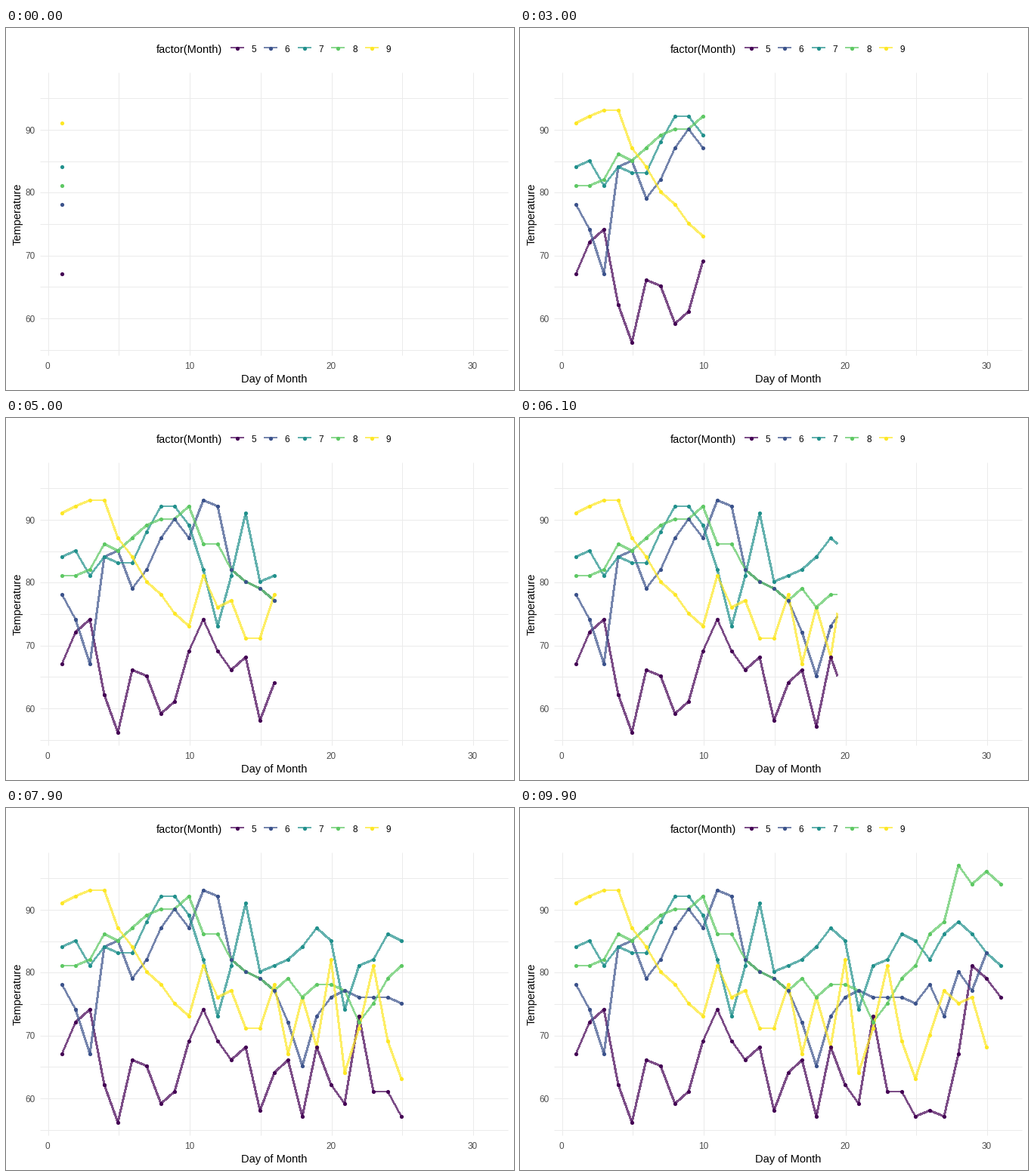
A matplotlib script for the animation above (10000 ms loop, 672x480 px).

```python
import numpy as np
import matplotlib.pyplot as plt
from matplotlib.animation import FuncAnimation
from matplotlib.collections import LineCollection

W, H, DPI = 672, 480, 96
PT = 72 / DPI  # points per pixel
FRAMES = 100
DX, DY = 18.74, 8.333  # pixels per day and per degree

MAY = [67, 72, 74, 62, 56, 66, 65, 59, 61, 69, 74, 69, 66, 68, 58, 64,
       66, 57, 68, 62, 59, 73, 61, 61, 57, 58, 57, 67, 81, 79, 76]
JUNE = [78, 74, 67, 84, 85, 79, 82, 87, 90, 87, 93, 92, 82, 80, 79,
        77, 72, 65, 73, 76, 77, 76, 76, 76, 75, 78, 73, 80, 77, 83]
JULY = [84, 85, 81, 84, 83, 83, 88, 92, 92, 89, 82, 73, 81, 91, 80, 81,
        82, 84, 87, 85, 74, 81, 82, 86, 85, 82, 86, 88, 86, 83, 81]
AUGUST = [81, 81, 82, 86, 85, 87, 89, 90, 90, 92, 86, 86, 82, 80, 79, 77,
          79, 76, 78, 78, 77, 72, 75, 79, 81, 86, 88, 97, 94, 96, 94]
SEPTEMBER = [91, 92, 93, 93, 87, 84, 80, 78, 75, 73, 81, 76, 77, 71, 71,
             78, 67, 76, 68, 82, 64, 71, 81, 69, 63, 70, 77, 75, 76, 68]
TEMPS = [MAY, JUNE, JULY, AUGUST, SEPTEMBER]
COLORS = ["#440154", "#3B528B", "#21908C", "#5DC863", "#FDE725"]

plt.rcParams["font.family"] = "Liberation Sans"
fig = plt.figure(figsize=(W / DPI, H / DPI), dpi=DPI, facecolor="white")
ax = fig.add_axes([0, 0, 1, 1])
ax.set_xlim(0, W)
ax.set_ylim(H, 0)
ax.axis("off")


def px(day):
    return np.round(54.8 + DX * np.asarray(day))


def py(temp):
    return np.floor(134.6 + DY * (90 - np.asarray(temp)))


def label(x, y, text, size=8.8, color="black", ha="center", **kw):
    ax.text(x, y, text, size=size, color=color, ha=ha, va="baseline", **kw)


def dots(x, y, colors):
    return ax.scatter(x, y, s=(5.2 * PT) ** 2, c=colors, linewidths=0, zorder=4)


def draw_grid():
    style = dict(color="#EBEBEB", lw=PT, zorder=1, solid_capstyle="butt")
    for day in range(0, 31, 5):
        ax.plot([px(day) + 0.5] * 2, [59, 434], **style)
        if day % 10 == 0:
            label(px(day) + 0.3, 452, str(day), color="#4D4D4D")
    for temp in range(55, 100, 5):
        ax.plot([45, 664], [py(temp) + 0.5] * 2, **style)
        if temp % 10 == 0:
            label(39, py(temp) + 5.5, str(temp), color="#4D4D4D", ha="right")


def draw_legend():
    label(199, 33, "factor(Month)", size=11, ha="left")
    for i, color in enumerate(COLORS):
        x = 305.5 + 44.65 * i
        ax.plot([x - 9, x + 9], [26, 26], color=color, alpha=0.7, lw=2 * PT,
                solid_capstyle="butt", antialiased=False, zorder=3)
        dots([x], [26.5], [color])
        label(x + 18.6, 32, str(5 + i), ha="left")


draw_grid()
draw_legend()
label(354.5, 470, "Day of Month", size=11)
label(20, 247, "Temperature", size=11, rotation=90, rotation_mode="anchor")

days = np.arange(1, 32)
arrival = np.round((days - 1) * (FRAMES - 1) / 30)

# Points by day; the earlier month lies on top from day 9 on
points = []
for day in days:
    months = range(5) if day < 9 else range(4, -1, -1)
    points += [(day, TEMPS[m][day - 1], COLORS[m])
               for m in months if day <= len(TEMPS[m])]
point_days = np.array([p[0] for p in points])
point_xy = np.column_stack([px(point_days), py([p[1] for p in points])]) + 0.5
point_colors = np.array([p[2] for p in points])

lines = []
for color in COLORS:
    line = LineCollection([], colors=color, alpha=0.7, antialiaseds=False,
                          capstyle="butt", zorder=3)
    lines.append(ax.add_collection(line, autolim=False))
marks = dots(point_xy[:, 0], point_xy[:, 1], point_colors)


def line_width(rise):
    slope = abs(rise) * DY / DX
    return (1.4 if 1.2 < slope < 2.4 else 2) * PT


def update(frame):
    head = np.interp(frame, arrival, days)
    for line, temps in zip(lines, TEMPS):
        segments, widths = [], []
        for day, (a, b) in enumerate(zip(temps, temps[1:]), 1):
            part = min(head - day, 1)
            if part <= 0:
                break
            segments.append([(px(day), py(a)),
                             (px(day + part), py(a + (b - a) * part))])
            widths.append(line_width(b - a))
        line.set_segments(segments)
        line.set_linewidths(widths or [PT])
    shown = point_days <= head + 1e-6
    marks.set_offsets(point_xy[shown])
    marks.set_facecolors(point_colors[shown])
    return [*lines, marks]


anim = FuncAnimation(fig, update, frames=FRAMES, interval=100, repeat=True)
plt.show()
```
